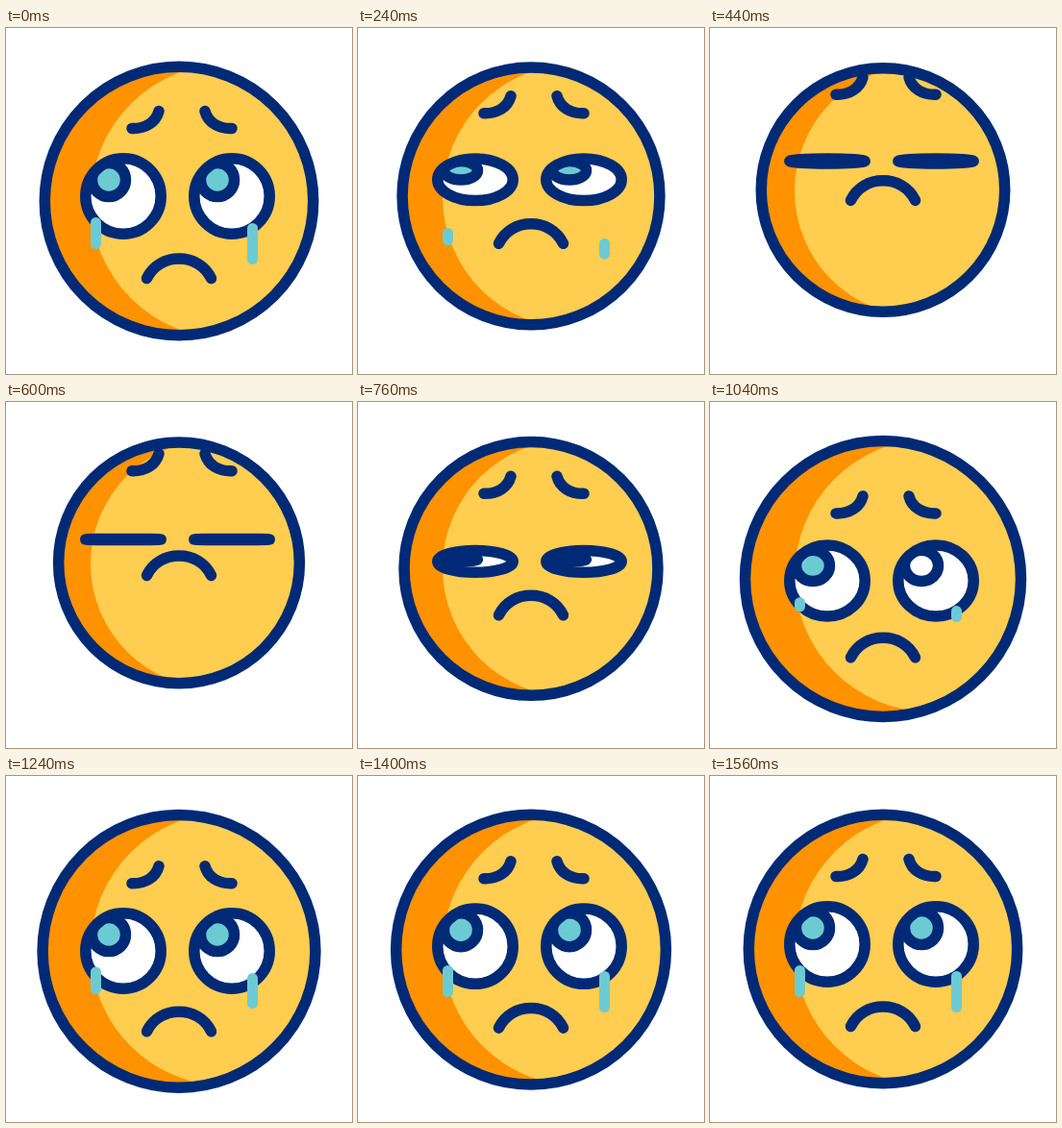
These frames come from a looping animation (360 px wide and 360 px high, 2 s). An HTML page:

```html
<!DOCTYPE html>
<html lang="en">
<head>
<meta charset="utf-8">
<title>Sad blinking face</title>
<style>
  html, body { margin: 0; width: 100%; height: 100%; overflow: hidden; background: #fff; }
  svg { display: block; width: 100%; height: 100%; }
  .line { fill: none; stroke: #012a76; stroke-width: 11.5; stroke-linecap: round; }
  .tear { stroke: #6ccbd2; stroke-linecap: round; }
  .white { fill: #fff; }
</style>
</head>
<body>
<svg viewBox="0 0 360 360">
  <defs>
    <clipPath id="faceClip"><circle class="face" cx="180"/></clipPath>
    <clipPath id="eyeClip"><ellipse class="eye" cx="122" rx="39.2"/></clipPath>
    <path id="brow" d="M131 104.5C145 105 156 98 159 86.5"/>
  </defs>
  <g clip-path="url(#faceClip)">
    <rect width="360" height="360" fill="#ff9200"/>
    <circle id="light" fill="#ffcd50"/>
    <g id="brows" class="line">
      <use href="#brow"/>
      <use href="#brow" transform="translate(366) scale(-1 1)"/>
    </g>
  </g>
  <circle class="face line" cx="180"/>
  <path id="mouth" class="line" d="M146.5 260.5C153 247 166 240 180 240S207 247 213.5 260.5"/>
  <g id="eyes">
    <g>
      <ellipse class="eye white" cx="122" rx="39.2"/>
      <g clip-path="url(#eyeClip)">
        <ellipse class="pupil line" cx="107" rx="17.5"/>
      </g>
      <ellipse class="eye line" cx="122" rx="39.2"/>
    </g>
  </g>
  <line class="tear" x1="93.5" x2="93.5"/>
  <line class="tear" x1="256.5" x2="256.5"/>
</svg>
<script>
const LOOP = 2000, STEP = 40;
const CLOSED = 560, PEAK = 1120, REST = 1560;

const $ = s => document.querySelector(s);
const $$ = s => [...document.querySelectorAll(s)];
const mix = (a, b, p) => a + (b - a) * p;
const span = (t, from, to) => Math.min(1, Math.max(0, (t - from) / (to - from)));
const smooth = p => p * p * (3 - 2 * p);
const easeOut = power => p => 1 - (1 - p) ** power;
const soft = easeOut(1.7), quick = easeOut(2);

// Moves from open to closed, overshoots on the way back, then settles.
function part(open, closed, over, { shut = CLOSED, from = CLOSED, peak = PEAK, rise = soft } = {}) {
  return t => {
    if (t < CLOSED) return mix(open, closed, smooth(span(t, 0, shut)));
    if (t < PEAK) return mix(closed, over, rise(span(t, from, peak)));
    return mix(over, open, soft(span(t, PEAK, REST)));
  };
}

const head = { peak: 1040, rise: smooth };
const faceR = part(139.7, 125, 143.5, head);
const faceY = part(180, 167, 184, head);
const lightX = part(231, 217, 230, head);
const lightY = part(180, 168, 180.5, head);
const mouthY = part(0, -92, 9);
const browY = part(0, -40, 12.5, { rise: quick });
const eyeY = part(175, 136, 187, { shut: 520, rise: quick });
const lid = part(1, 0, 1, { shut: 520, rise: smooth });
const gaze = part(1, 0, 1, { shut: 520, from: 660, rise: smooth });

const eyes = $('#eyes');
const twin = eyes.firstElementChild.cloneNode(true);
twin.setAttribute('transform', 'translate(113)');
eyes.append(twin);

const faces = $$('.face'), whites = $$('.eye'), pupils = $$('.pupil'), tears = $$('.tear');
const light = $('#light'), mouth = $('#mouth'), brows = $('#brows');

function set(el, attrs) {
  for (const name in attrs) el.setAttribute(name, attrs[name]);
}

// Tears slide down and dry up, then well up again under the eyes.
function drawTear(el, t, top, length) {
  const falling = t < CLOSED;
  const size = falling ? 1 - span(t, 0, 360) : span(t, 980, 1300);
  const y = top + (1 - size) * length * (falling ? 0.75 : 0.35);
  set(el, { y1: y, y2: y + length * size, 'stroke-width': Math.min(11, 80 * size) });
}

function draw(t) {
  faces.forEach(el => set(el, { cy: faceY(t), r: faceR(t) }));
  set(light, { cx: lightX(t), cy: lightY(t), r: lightX(t) - 88 });
  whites.forEach(el => set(el, { cy: eyeY(t), ry: 39.2 * lid(t) }));
  pupils.forEach(el => {
    set(el, { cy: eyeY(t) - 17 * gaze(t), ry: 17.5 * gaze(t) });
    el.style.fill = '#6ccbd2';
  });
  if (t > CLOSED && t < 1080) pupils[1].style.fill = '#fff';
  set(mouth, { transform: `translate(0 ${mouthY(t)})` });
  set(brows, { transform: `translate(0 ${browY(t)})` });
  drawTear(tears[0], t, 202.5, 22);
  drawTear(tears[1], t, 208.5, 32);
}

const start = performance.now();
function tick() {
  const t = (performance.now() - start) % LOOP;
  draw(Math.floor(t / STEP) * STEP);
  requestAnimationFrame(tick);
}
tick();
</script>
</body>
</html>
```
